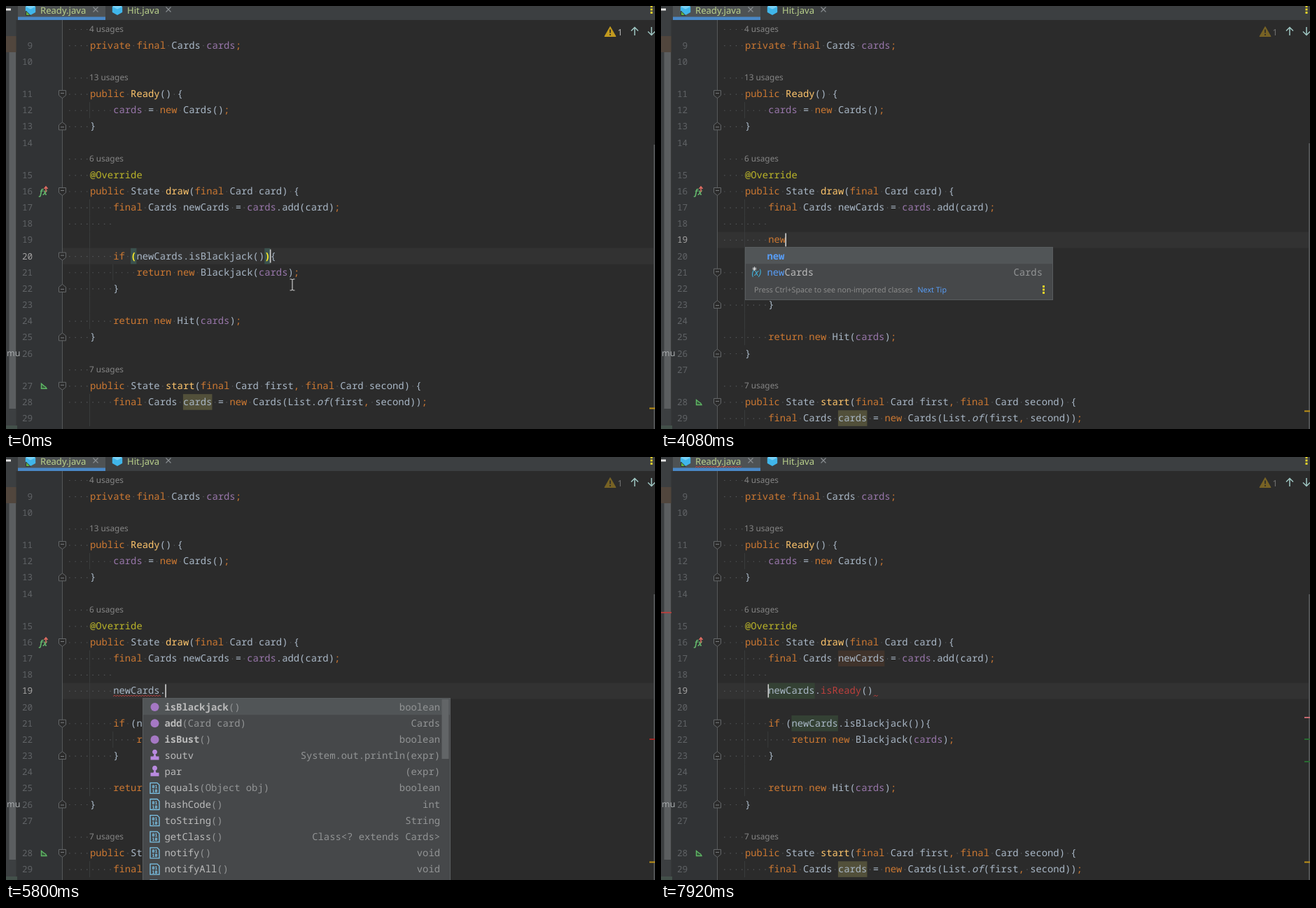
Recreate the animation shown at these times as an HTML page. Size 927 px wide and 604 px high, loop 8 s.

```html
<!DOCTYPE html>
<html lang="en">
<head>
<meta charset="utf-8">
<title>Code editor</title>
<style>
  html, body { margin: 0; width: 100%; height: 100%; overflow: hidden; background: #2b2b2b; }
  svg { display: block; width: 927px; height: 604px; }
  text { white-space: pre; text-rendering: geometricPrecision; font-family: "Noto Sans", sans-serif; }
  .code { font: 13.85px "Noto Sans Mono", monospace; fill: #a9b7c6; }
  .num { font: 12.6px "Noto Sans Mono", monospace; text-anchor: end; }
  .tab { font-size: 13.1px; fill: #b9d08b; }
  .usages { font-size: 11.8px; fill: #858585; }
  .hint { font-size: 10.68px; fill: #8c8c8c; }
  .bits { font: bold 6.5px "Noto Sans Mono", monospace; fill: #7cc4e8; text-anchor: middle; }
</style>
</head>
<body>
<svg viewBox="0 0 927 604">
  <g id="editor"></g>
  <g id="frame"></g>
  <g id="popups"></g>
  <path id="pointer" d="M-3.5-8H-1.5L0-7L1.5-8H3.5M0-7V7M-3.5 8H-1.5L0 7L1.5 8H3.5" fill="none" stroke="#c8c8c8" stroke-width="1.2"/>
</svg>
<script>
const LOOP = 8000, CHAR = 8.31, LEFT = 86.7, ROW = 23.15;
const ENTER = 3520, HOME = 7600, ERROR = 7720, MARKS = 7840;
const TYPED_ROW = 13;

// Token marks: # field, ~ declaration, / static call, ! unresolved, ¤ matched brace
const lines = [
  '$4 usages', '    private final Cards #cards;', '',
  '$13 usages', '    public ~Ready() {', '        #cards = new Cards();', '    }', '',
  '$6 usages', '    @Override', '    public State ~draw(final Card card) {',
  '        final Cards newCards = #cards.add(card);', '        ', '',
  '        if (newCards.isBlackjack()){', '            return new Blackjack(#cards);', '        }', '',
  '        return new Hit(#cards);', '    }', '',
  '$7 usages', '    public State ~start(final Card first, final Card second) {',
  '        final Cards cards = new Cards(List./of(first, second));', ''
];

const typing = [
  [3520, ''], [3680, 'n'], [3800, 'ne'], [3920, 'new'], [5280, 'newCards'],
  [5600, 'newCards.'], [5880, 'newCards.i'], [6040, 'newCards.is'], [6600, 'newCards.isR'],
  [6720, 'newCards.isRe'], [6880, 'newCards.isRea'], [6960, 'newCards.isRead'],
  [7000, 'newCards.isReady'], [7200, 'newCards.isReady('], [7280, 'newCards.isReady()']
];

const marks = {
  '#': 'fill="#9876aa"', '~': 'fill="#ffc66d"', '/': 'font-style="italic"',
  '!': 'fill="#bc3f3c"', '¤': 'fill="#ffef28" font-weight="bold"'
};
const keyword = /^(private|public|final|new|return|if|[;,])$/;

const within = (t, from, to) => t >= from && t < to;
const rowY = row => 33 + ROW * row;
const colX = col => LEFT + CHAR * col;
const esc = s => s.replace(/&/g, '&amp;').replace(/</g, '&lt;');
const rect = (x, y, w, h, fill, more = '') => `<rect x="${x}" y="${y}" width="${w}" height="${h}" fill="${fill}" ${more}/>`;
const path = (d, stroke, width = 1, fill = 'none') => `<path d="${d}" stroke="${stroke}" stroke-width="${width}" fill="${fill}"/>`;
const text = (x, y, cls, s, more = '') => `<text x="${x}" y="${y}" class="${cls}" ${more}>${esc(s)}</text>`;
const shade = (row, col, len, fill) => rect(colX(col), rowY(row) - 11.3, len * CHAR, 22.6, fill);
const dots = (x, y) => [-4.5, 0, 4.5].map(d => rect(x - 1.5, y + d - 1.5, 3, 3, '#e8d32a')).join('');

function squiggle(x, y, width) {
  let d = `M${x} ${y}`;
  for (let i = 0; i < width / 2; i++) d += `l2 ${i % 2 ? 2 : -2}`;
  return path(d, '#bc3f3c');
}

function codeLine(source, row) {
  const y = rowY(row);
  let col = 0, spaces = '', backs = '', spans = '';
  for (const [, mark, token] of source.matchAll(/([#~\/!¤]?)(@?\w+|[^\w\s]|\s)/g)) {
    const x = colX(col);
    if (token === ' ') spaces += `M${x + CHAR / 2 - .6} ${y + .5}h1.2`;
    else {
      const style = marks[mark] || (keyword.test(token) ? 'fill="#cc7832"' : token[0] === '@' ? 'fill="#bbb529"' : '');
      if (mark === '¤') backs += shade(row, col, 1, '#3b514d');
      spans += `<tspan x="${x}" ${style}>${esc(token)}</tspan>`;
    }
    col += token.length;
  }
  return path(spaces, '#5a5d60', 1.2) + backs + `<text class="code" y="${y + 4.5}">${spans}</text>`;
}

function fold(y, up) {
  const s = up ? -1 : 1;
  return path(`M75.5 ${y - 5 * s}H85.5V${y + 2 * s}L80.5 ${y + 6 * s}L75.5 ${y + 2 * s}Z`, '#65686a', 1, '#2b2b2b') +
    path(`M78 ${y - s}h5`, '#7b7e80');
}

function gutterIcon(source, y) {
  if (source.includes('~draw'))
    return text(48, y + 5, '', 'fx', 'fill="#63b36b" font-size="12" font-style="italic" font-weight="bold"') +
      path(`M57 ${y + 1}v-7M54.5 ${y - 3.5}l2.5-3l2.5 3`, '#e06c62', 1.5);
  if (source.includes('~start'))
    return path(`M50.5 ${y - 3}V${y + 4}H58Q57 ${y + 1} 54 ${y}Z`, '#5fb865', 1.4, '#35543a');
  return '';
}

function stateAt(t) {
  const typed = (typing.filter(([at]) => t >= at).pop() || [0, ''])[1];
  let caret;
  if (t < 880) caret = [14, 35];
  else if (t < 1400) caret = [13, 0];
  else if (t < ENTER) caret = [12, 8];
  else caret = [TYPED_ROW, 8 + (t < HOME ? typed.length : 0)];
  return {
    typed, caret,
    entered: t >= ENTER,
    bracesOld: t < 880,
    braces: within(t, 7200, HOME),
    pair: t >= 7200,
    blink: within(t, 2680, 3120) || within(t, 4680, 5120),
    dim: within(t, 1400, 1720) || t >= 3680,
    usages: within(t, 5280, 5600) || t >= MARKS,
    invalid: within(t, 5280, ERROR),
    broken: within(t, 5600, ERROR),
    unresolved: t >= ERROR,
    fileError: t >= MARKS,
    popup: within(t, 4080, 4880) ? 'keyword' : within(t, 4880, 5280) ? 'variable'
      : within(t, 5720, 5960) ? 'members' : within(t, 5960, 6600) ? 'filtered' : ''
  };
}

function drawEditor(s) {
  const doc = lines.slice();
  if (s.bracesOld) doc[14] = '        if ¤(newCards.isBlackjack()¤){';
  if (s.entered) {
    let typed = s.pair ? 'newCards.isReady()' : s.typed;
    if (s.braces) typed = 'newCards.isReady¤(¤)';
    if (s.unresolved) typed = typed.replace('isReady', '!isReady');
    doc.splice(TYPED_ROW, 0, ' '.repeat(8) + typed);
    doc.length = 25;
  }
  const [caretRow, caretCol] = s.caret;
  let out = rect(80, 0, 847, 604, '#2b2b2b') + rect(16, 0, 64, 604, '#313335') +
    rect(80, rowY(caretRow) - 11.5, 847, ROW, '#323232') + path('M80.5 20V604', '#55585a');
  let number = 9, depth = 0;
  if (s.usages) out += shade(11, 20, 8, '#40332b') + shade(13, 8, 8, '#344134') + shade(15, 12, 8, '#344134');
  doc.forEach((source, row) => {
    const y = rowY(row), body = source.trim();
    if (source[0] === '$') {
      out += codeLine('    ', row) + text(119, y + 4, 'usages', source.slice(1));
      return;
    }
    if (body === '}') depth--;
    for (let level = 1; level <= depth; level++)
      out += path(`M${colX(4 * level) - .4} ${y - 11.6}v${ROW}`, '#3a3c3d');
    if (body.startsWith('final Cards cards')) out += shade(row, 20, 5, '#52503a');
    out += text(38, y + 4.5, 'num', String(number++), `fill="${row === caretRow ? '#a4a3a3' : '#606366'}"`);
    out += codeLine(source, row) + gutterIcon(source, y);
    if (body === '}') out += fold(y, true);
    if (body.endsWith('{')) { out += fold(y, false); depth++; }
  });
  if (s.invalid) out += squiggle(colX(8), rowY(TYPED_ROW) + 8, 8 * CHAR);
  if (s.unresolved) out += squiggle(colX(26) + 1, rowY(TYPED_ROW) + 8, 6);
  if (!s.blink) out += rect(colX(caretCol) - .7, rowY(caretRow) - 9.5, 1.6, 19, '#d0d0d0');
  return out;
}

function tab(x, label, width, active) {
  const hex = (r, fill) => path(`M${x} ${5 - r}l${r * .9} ${r / 2}v${r}l${-r * .9} ${r / 2}l${-r * .9} ${-r / 2}v${-r}Z`, 'none', 0, fill);
  const end = x + width;
  return hex(8, '#40b6ea') + path(`M${x - 7} 1L${x} 4.5L${x + 7} 1L${x}-3Z`, 'none', 0, '#79d0f5') +
    (active ? path('M28.5 7V13.5H35Z', '#313335', 1, '#62b543') : '') +
    text(x + 14, 11, 'tab', label) + path(`M${end - 3.5} 1.5l7 7m0-7l-7 7`, '#8b9093', 1.1);
}

function drawFrame(s) {
  const mark = (y, fill) => rect(919, y - 1, 8, 2, fill);
  let out = rect(0, 0, 16, 604, '#3c3f41') + rect(0, 43, 15, 23, '#51463d') + rect(4.5, 66, 9.5, 509, '#5b5e60') +
    rect(14.5, 20, 1.5, 584, '#323435') + rect(0, 599, 16, 5, '#43504a') +
    text(1, 500, '', 'mu', 'font-size="12.5" fill="#a8abad"') + rect(15.8, 480, 64, 30, 'none') +
    rect(0, 0, 927, 20, '#3c3f41') + rect(17, 0, 125, 20, '#4e5254') + rect(17, 15.5, 125, 4.5, '#4a88c7') +
    rect(0, 3.5, 7, 3, '#e6e6e6') + tab(35, 'Ready.java', 93, true) + tab(159, 'Hit.java', 73, false) + dots(922, 5);
  out += `<g opacity="${s.dim ? .5 : 1}">` + path('M863 29.5L871 43.5H855Z', '#c29a1f', 1, '#c29a1f') +
    path('M863 33.5v5M863 40v2', '#2b2b2b', 1.7) + text(873.5, 42, '', '1', 'font-size="12.5" fill="#b5b5b5"') + '</g>';
  out += path('M898 42V31M893 35.5L898 30.5L903 35.5M922 30V41M917 36.5L922 41.5L927 36.5', '#9fc7c3', 1.5);
  out += rect(925, s.entered ? 196 : 198, 2, 408, '#505254') + mark(s.entered ? 578.5 : 574.5, '#be9117');
  if (s.broken) out += mark(403, '#9e2927');
  if (s.usages) out += mark(372, '#c46a70') + mark(403, '#286a31') + mark(435, '#286a31');
  if (s.fileError) out += rect(0, 221.3, 15, 1.8, '#bc3f3c') + squiggle(49, 15, 66);
  return out;
}

const own = (name, args, type) => ({ icon: 'own', name, args, type, bold: true });
const plain = (name, args, type, icon = 'method') => ({ icon, name, args, type });
const members = [
  own('isBlackjack', '()', 'boolean'), own('add', '(Card card)', 'Cards'), own('isBust', '()', 'boolean'),
  plain('soutv', '', 'System.out.println(expr)', 'stamp'), plain('par', '', '(expr)', 'stamp'),
  plain('equals', '(Object obj)', 'boolean'), plain('hashCode', '()', 'int'), plain('toString', '()', 'String'),
  plain('getClass', '()', 'Class<? extends Cards>'), plain('notify', '()', 'void'),
  plain('notifyAll', '()', 'void'), plain('wait', '()', 'void')
];
const words = [{ name: 'new', bold: true }, plain('newCards', '', 'Cards', 'variable')];

const icons = {
  own: (x, y) => `<circle cx="${x}" cy="${y}" r="6" fill="#a578c4"/>`,
  stamp: (x, y) => path(`M${x - 6} ${y + 6}v-5h4l1-3a3.5 3.5 0 1 1 2 0l1 3h4v5Z`, 'none', 0, '#b98ae0'),
  method: (x, y) => path(`M${x - 6.5} ${y - 7.5}h10l3 3v12h-13Z`, '#7cc4e8', 1.3) +
    text(x, y, 'bits', '01') + text(x, y + 6, 'bits', '10'),
  variable: (x, y) => text(x - 8, y + 4.5, '', '(x)', 'font-size="13" font-style="italic" fill="#40b6e0"') +
    path(`M${x - 7} ${y - 5}h6M${x - 4} ${y - 8}v6M${x - 6} ${y - 7}l4 4m0-4l-4 4`, '#d5d8da')
};

function popup(x, width, items, match, selected, fill, hint, linkX) {
  const top = 344.5, right = x + width;
  const height = hint ? 75 : 270;
  let out = rect(x, top, width, height, '#46484a', 'stroke="#595c5e"') +
    rect(x + .5, top + .5 + selected * ROW, width - 1, ROW, fill);
  items.forEach((item, i) => {
    const y = rowY(14 + i);
    if (item.icon) out += icons[item.icon](x + 17, y);
    const hit = item.name.startsWith(match) ? match : '';
    out += `<text class="code" x="${x + 31}" y="${y + 4.5}"><tspan font-weight="${item.bold ? 700 : 400}">` +
      `<tspan fill="#589df6">${hit}</tspan><tspan fill="#bbbbbb">${item.name.slice(hit.length)}</tspan></tspan>` +
      `<tspan fill="#929495">${item.args || ''}</tspan></text>`;
    if (item.type) out += text(right - 14.5, y + 4.5, 'code', item.type, 'text-anchor="end" style="fill:#929495"');
  });
  if (hint) out += text(x + 12.5, 409.3, 'hint', hint) +
    text(linkX, 409.3, 'hint', 'Next Tip', 'style="fill:#589df6"') + dots(right - 13, 405);
  else out += rect(right - 12, 346, 10, 85, '#626567');
  return out;
}

function drawPopup(kind) {
  const importHint = 'Press Ctrl+Space to see non-imported classes';
  const dotHint = 'Press Ctrl+. to choose the selected (or first) suggestion and insert a dot afterwards';
  switch (kind) {
    case 'keyword': return popup(120.5, 439, words, 'new', 0, '#515557', importHint, 366.5);
    case 'variable': return popup(120.5, 439, words, 'new', 1, '#113a5c', importHint, 366.5);
    case 'members': return popup(195.5, 439, members, '', 0, '#515557');
    case 'filtered': return popup(195.5, 542, [members[0], members[2]], 'is', 0, '#515557', dotHint, 656);
  }
  return '';
}

const pointerPath = [[120, 409, 398], [920, 376, 323], [1080, 376, 323], [1520, 361, 303]];
function pointerAt(t) {
  const next = pointerPath.findIndex(([at]) => at > t);
  if (next <= 0) return pointerPath.at(next).slice(1);
  const [t0, x0, y0] = pointerPath[next - 1], [t1, x1, y1] = pointerPath[next];
  const k = (t - t0) / (t1 - t0), ease = k * k * (3 - 2 * k);
  return [x0 + (x1 - x0) * ease, y0 + (y1 - y0) * ease].map(Math.round);
}

const [editor, frame, popups, pointer] = ['editor', 'frame', 'popups', 'pointer'].map(id => document.getElementById(id));
const start = performance.now();
let shown = '';

function tick() {
  const t = (performance.now() - start) % LOOP;
  const state = stateAt(t), key = JSON.stringify(state);
  if (key !== shown) {
    shown = key;
    editor.innerHTML = drawEditor(state);
    frame.innerHTML = drawFrame(state);
    popups.innerHTML = drawPopup(state.popup);
  }
  pointer.style.display = t < ENTER ? '' : 'none';
  pointer.setAttribute('transform', `translate(${pointerAt(t)})`);
  requestAnimationFrame(tick);
}
tick();
</script>
</body>
</html>
```
